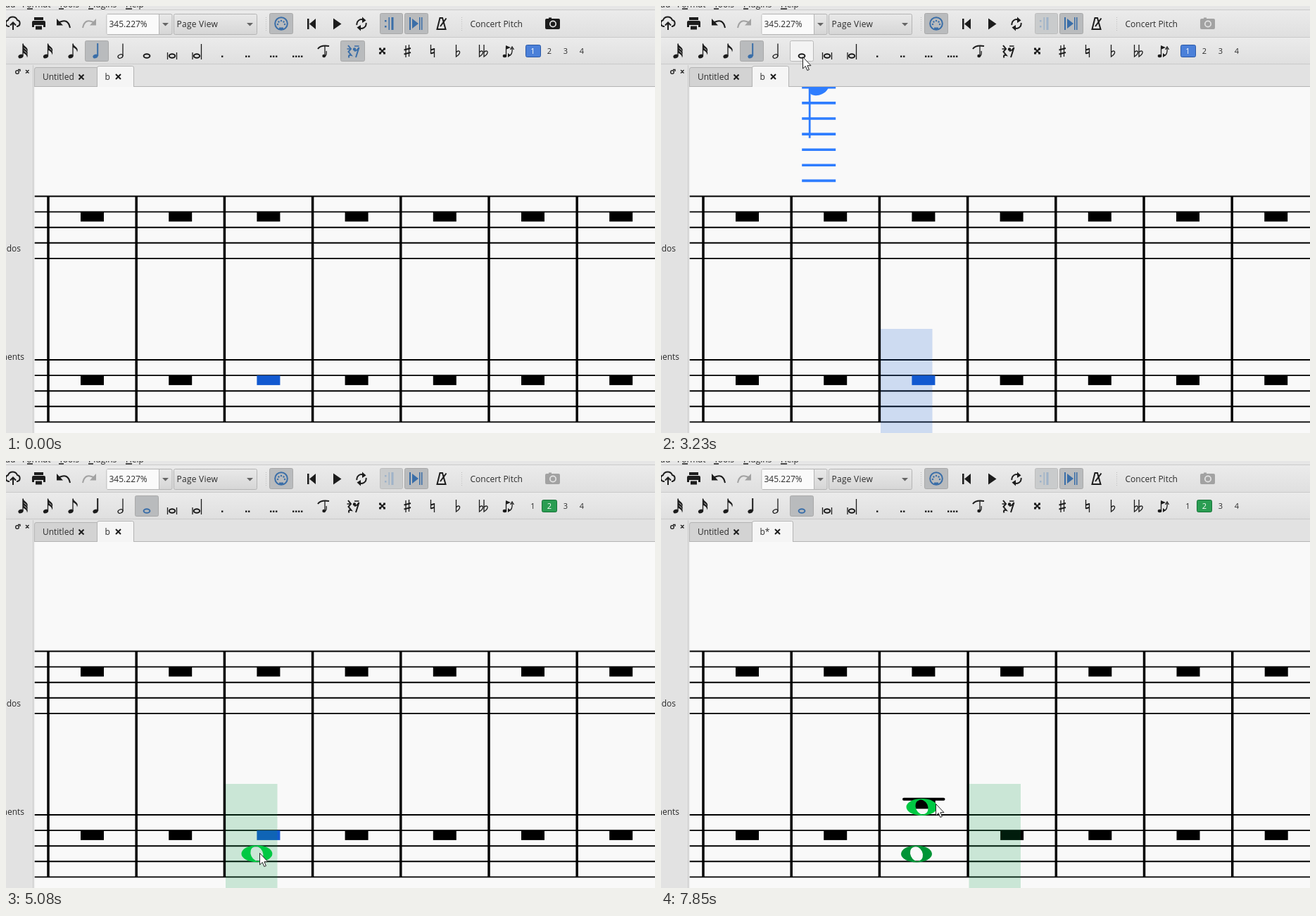
Animation of 922x607 px, one loop 8 s. Source, as an HTML page:

```html
<!DOCTYPE html>
<html lang="en">
<head>
<meta charset="utf-8">
<title>Score editor</title>
<style>
  html, body { margin: 0; width: 100%; height: 100%; overflow: hidden; background: #f9f9f9; }
  svg { display: block; width: 922px; height: 607px; }
  text { font: 12px "Open Sans", "Noto Sans", sans-serif; fill: #2b2b2b; }
  .mid { text-anchor: middle; font-size: 11px; }
  .end { text-anchor: end; }
  .line { fill: none; stroke: #1c1c1c; stroke-width: 2; }
  .thin { fill: none; stroke: #1c1c1c; stroke-width: 1.3; }
  .ink { fill: #1c1c1c; }
  .blue .ink { fill: #3a6ea8; }
  .blue .line, .blue .thin { stroke: #3a6ea8; }
  .pale .ink { fill: #9fb3c8; }
  .pale .line, .pale .thin { stroke: #9fb3c8; }
  .gray .ink { fill: #a2a2a2; }
  .gray .line { stroke: #a2a2a2; }
  .down { fill: #b9bbbd; stroke: #a9a9a9; }
  .pale .down { fill: #c9cbcc; stroke: #bdbdbd; }
  .hover { fill: #f3f3f3; stroke: #b9b9b9; }
  .up { fill: none; stroke: none; }
  .edge { stroke: #b4b4b4; }
</style>
</head>
<body>
<svg viewBox="0 0 922 607">
  <defs>
    <linearGradient id="bar" x2="0" y2="1"><stop stop-color="#ebebeb"/><stop offset="1" stop-color="#dfdfdf"/></linearGradient>
    <linearGradient id="btn" x2="0" y2="1"><stop stop-color="#e9e9e9"/><stop offset="1" stop-color="#d6d6d6"/></linearGradient>
    <clipPath id="page"><rect x="40.5" y="115" width="882" height="492"/></clipPath>
  </defs>

  <rect width="922" height="607" fill="#f9f9f9"/>
  <g clip-path="url(#page)">
    <g id="staff"></g>
    <rect id="select" y="459" width="73.5" height="148" opacity=".19"/>
    <path id="placed" fill="#009436" fill-rule="evenodd"/>
    <g id="preview">
      <path id="ledgers" fill="none" stroke-width="3.6"/>
      <path id="stem" fill="none" stroke-width="2.8"/>
      <path id="head" fill-rule="evenodd"/>
    </g>
  </g>

  <!-- side panel and tabs -->
  <path d="M0 83H922V115H40.5V607H0Z" fill="#e2e2e2"/>
  <path d="M38.5 84V607" stroke="#cbcbcb"/>
  <text class="end" x="21" y="349">ndos</text>
  <text class="end" x="26" y="503">ments</text>
  <circle class="thin" cx="16" cy="94" r="2.3"/><path class="thin" d="M17 90.500H20V93M28 91L32.500 95.500M32.500 91L28 95.500"/>
  <path class="edge" d="M40.500 114.500V90Q40.500 87.500 43 87.500H129.500V114.500" fill="#d3d3d3"/>
  <path class="edge" d="M40 114.500H922"/>
  <path class="edge" id="tab" fill="#f5f5f5"/>
  <text x="52" y="105">Untitled</text>
  <path class="line" d="M103.500 97.500L110.500 104.500M110.500 97.500L103.500 104.500"/>
  <text id="name" x="140.500" y="104.500"></text>
  <path class="line" id="close" d="M-3.500 -3.500L3.500 3.500M3.500 -3.500L-3.500 3.500"/>

  <!-- menu and toolbars -->
  <rect width="922" height="6" fill="#e6e6e6"/>
  <rect y="6" width="922" height="39" fill="url(#bar)"/>
  <rect y="45" width="922" height="38" fill="url(#bar)"/>
  <path d="M0 5.500H922M0 44.500H922M0 82.500H922" stroke="#cacaca"/>
  <text x="-9" y="2">Add</text><text x="23" y="2">Format</text><text x="75" y="2">Tools</text>
  <text x="117" y="2">Plugins</text><text x="170" y="2">Help</text>
  <path class="thin" stroke-width="1" d="M30 4H38M75 4H82M117 4H124M170 4H179"/>

  <path class="line" d="M5 29H4A4.600 4.600 0 0 1 3 20A7 7 0 0 1 16 20A4.600 4.600 0 0 1 16 29H15M10 34V24M6 27.500L10 23.500L14 27.500"/>
  <path class="ink" d="M40 16H53V20H40ZM39 21H54Q56 21 56 23V30H53V27H40V30H37V23Q37 21 39 21ZM42 28.500H51V33.500H42Z"/>
  <g id="undo"><path class="line" d="M76 23Q88 17 91 31"/><path class="ink" d="M72 18V27.500H81Z"/></g>
  <g class="gray" transform="translate(200) scale(-1 1)"><path class="line" d="M76 23Q88 17 91 31"/><path class="ink" d="M72 18V27.500H81Z"/></g>

  <rect class="edge" x="143" y="11.500" width="93" height="29" rx="2" fill="url(#btn)"/>
  <rect x="143.500" y="12" width="73.500" height="28" fill="#fafafa"/>
  <path class="edge" d="M217.500 12V40"/>
  <rect class="edge" x="238.500" y="11.500" width="118" height="29" rx="2" fill="url(#btn)"/>
  <path d="M222 24H231L226.500 28.500ZM342 24H351L346.500 28.500Z" fill="#666"/>
  <text x="146.500" y="30">345.227%</text>
  <text x="242.500" y="30" letter-spacing=".25">Page View</text>

  <path d="M369.500 16V36M647.500 16V36" stroke="#bdbdbd" stroke-dasharray="1 2"/>
  <g class="blue">
    <rect class="down" x="374.500" y="10.500" width="33" height="29" rx="2"/>
    <circle class="line" cx="391" cy="25" r="8.800" stroke-width="1.800"/>
    <path class="ink" d="M388 30.500H394V33H388Z"/>
    <g class="ink" id="pins"></g>
  </g>
  <path class="ink" d="M428 18H430.500V33H428ZM440 18V33L431 25.500ZM465 17.500L476.500 25.500L465 33.500Z"/>
  <path class="line" d="M498.500 27A6.500 6.500 0 0 1 508 20M511.500 24A6.500 6.500 0 0 1 502 31"/>
  <path class="ink" d="M506 15.500L511.500 20.500L506 24ZM504 27L498.500 30.500L504 35.500Z"/>
  <g id="repeat">
    <rect class="down" x="531.500" y="10.500" width="32" height="29" rx="2"/>
    <path class="ink" d="M538 20H540.500V22.500H538ZM538 28H540.500V30.500H538ZM543.500 16H545V34H543.500ZM547.500 16H550.500V34H547.500Z"/>
  </g>
  <g class="blue">
    <rect class="down" x="566.500" y="10.500" width="33" height="29" rx="2"/>
    <path class="ink" d="M573 16H575V34H573ZM577 18L586 25L577 32ZM587 16H588.500V34H587ZM590 16H591.500V34H590Z"/>
  </g>
  <path class="line" stroke-width="1.800" d="M616.500 17H620L624.500 33H612.500ZM617 29L625.500 17.500"/>
  <text x="659.500" y="30">Concert Pitch</text>
  <g id="camera">
    <path class="ink" d="M768 18H771V16.500H775V18H785Q787 18 787 20V31Q787 33 785 33H768Q766 33 766 31V20Q766 18 768 18Z"/>
    <circle cx="777" cy="25.500" r="5" fill="#e4e4e4"/><circle class="ink" cx="777" cy="25.500" r="3.300"/>
  </g>

  <g id="notes"></g>
  <g id="rests">
    <rect x="475.500" y="49.500" width="34" height="29" rx="2"/>
    <path class="line" d="M486 56L490 61L486.500 65L490.500 70Q485.500 69 487.500 73.500M495 63.500Q498 64.500 501.500 59L497 73"/>
    <circle class="ink" cx="495" cy="61.500" r="2.200"/>
    <path class="thin" d="M484.500 61H489M495 57H501.500"/>
  </g>
  <path class="line" d="M443 61Q447 55 459 57"/><path class="thin" d="M453 57V72Q456 69 455 64"/><circle class="ink" cx="451.500" cy="71" r="2.200"/>
  <path class="line" d="M531 60.500L538 67.500M538 60.500L531 67.500"/>
  <path class="ink" d="M530 59.500h3v3h-3zM536 59.500h3v3h-3zM530 65.500h3v3h-3zM536 65.500h3v3h-3z"/>
  <path class="thin" d="M568 56V73M572.500 55V72M603.500 55V68M608.500 60V73"/>
  <path class="line" d="M565.500 62.500L575 60M565.500 68.500L575 66M603.500 62.500L608.500 61M603.500 67.500L608.500 66"/>
  <g id="flats"></g>
  <path class="thin" d="M710.500 71V58M714.500 71Q720 69 719 60M716.500 62L719 58L721.500 62"/>
  <ellipse class="ink" cx="708.500" cy="71" rx="2.800" ry="2.200"/><path class="ink" d="M710 56L717 59L710 62ZM713 67V73L717 70Z"/>
  <rect id="voice" y="55.500" width="21" height="17" rx="2"/>
  <g id="digits"></g>

  <path id="cursor" d="M0 0V16.500L3.800 13L6.300 19L8.900 18L6.400 12.200H11.500Z" fill="#fff" stroke="#222" stroke-linejoin="round"/>
</svg>
<script>
const LOOP = 8000, PITCH = 125.2, GAP = 22.1;
const $ = id => document.getElementById(id);
const set = (id, attrs) => { for (const k in attrs) $(id).setAttribute(k, attrs[k]); };
const show = (id, on) => set(id, { visibility: on ? 'visible' : 'hidden' });
const barX = i => 60 + PITCH * i;
const range = (n, f) => Array.from({ length: n }, (_, i) => f(i)).join('');

// Toolbar glyphs
const blob = (x, y = 71.5) =>
  `<ellipse class="ink" cx="${x}" cy="${y}" rx="3.7" ry="2.8" transform="rotate(-22 ${x} ${y})"/>`;
const ring = (x, rx, ry) => `<ellipse class="line" cx="${x}" cy="71" rx="${rx}" ry="${ry}"/>`;
const flagged = (x, n) => blob(x) + `<path class="thin" d="M${x + 3} 71V53.5"/>` +
  range(n, i => `<path class="ink" d="M${x + 3} ${53 + i * 4}q1 3 4.500 5.500q3.500 3 1.500 7q0 -4.500 -6 -7z"/>`);
const button = (id, x, glyph) =>
  `<g id="${id}"><rect x="${x}" y="49.500" width="33" height="29" rx="2"/>${glyph}</g>`;
const dots = (x, n) =>
  range(n, i => `<rect class="ink" x="${x - n * 2 + i * 4 + 1}" y="70.500" width="2.400" height="2.400"/>`);

$('notes').innerHTML = flagged(21, 3) + flagged(56.5, 2) + flagged(92, 1) +
  button('quarter', 112.5, blob(127) + '<path class="line" stroke-width="1.600" d="M130.200 71V53"/>') +
  '<ellipse class="thin" cx="162.500" cy="71.500" rx="3.600" ry="2.500" transform="rotate(-25 162.500 71.500)"/><path class="thin" d="M166 71V53.500"/>' +
  button('whole', 183.5, ring(200, 4.4, 2.8)) +
  ring(236, 4.2, 2.7) + '<path class="thin" d="M229.500 66V76M242.500 66V76"/>' +
  ring(271, 4.2, 2.7) + '<path class="thin" d="M265 66V76M277.500 54V76"/>' +
  dots(307, 1) + dots(343, 2) + dots(380, 3) + dots(414, 4);
$('flats').innerHTML = [639.5, 672.5, 679].map(x =>
  `<path class="thin" stroke-width="1.600" d="M${x} 55V72Q${x + 6} 68 ${x + 5} 65Q${x + 3} 62.500 ${x} 66"/>`).join('');
$('digits').innerHTML = [748.5, 772, 795, 818].map((x, i) =>
  `<text class="mid" x="${x}" y="68">${i + 1}</text>`).join('');
$('pins').innerHTML = range(5, i => {
  const a = Math.PI * (1 + i / 4);
  return `<circle cx="${391 + 5 * Math.cos(a)}" cy="${26 + 5 * Math.sin(a)}" r="1.200"/>`;
});

// Score
const rest = (x, y, id = '') => `<rect id="${id}" x="${x}" y="${y}" width="33" height="13.700"/>`;
const column = i => {
  const x = barX(i);
  return `<path d="M${x} 270V592" stroke="#000" stroke-width="3.500"/>` +
    rest(x + 46, 292.7) + rest(x + 46, 525.2, i === 2 ? 'chosen' : '');
};
$('staff').innerHTML =
  range(10, i => {
    const y = (i < 5 ? 270.5 : 392.5) + GAP * i;
    return `<path d="M40 ${y}H922" stroke="#000" stroke-width="1.900"/>`;
  }) +
  range(3, column) + `<g id="later">${range(4, i => column(i + 3))}</g>` +
  '<path id="restLine" d="M345 480.700H401.500" stroke="#000" stroke-width="4" stroke-linecap="round"/>';

const WHOLE = 'M-22 0A22 12 0 1 1 22 0A22 12 0 1 1 -22 0ZM-4.400 -9.500A8 10.500 -25 1 1 4.400 9.500A8 10.500 -25 1 1 -4.400 -9.500Z';
const QUARTER = 'M-13.600 6.340A15 10.500 -25 1 1 13.600 -6.340A15 10.500 -25 1 1 -13.600 6.340Z';
set('placed', { d: WHOLE, transform: 'translate(363 558.500)' });

// Pointer moves: start, end, steps, control x y, end x y
const MOVES = [
  [140, 750, 9, 500, 560, 374, 529],
  [910, 1140, 4, 346, 508, 381, 526],
  [2390, 3160, 11, 420, 250, 202, 72],
  [3230, 3230, 1, 201, 72, 201, 72],
  [3390, 3390, 1, 200, 72, 200, 72],
  [3540, 4310, 11, 860, 210, 765, 75],
  [4390, 4690, 5, 767, 68, 768, 64],
  [4860, 5080, 4, 600, 350, 360, 557],
  [5150, 5610, 7, 354, 619, 348, 557],
  [5690, 5690, 1, 347, 557, 347, 557],
  [6080, 6080, 1, 349, 556, 349, 556],
  [6540, 6540, 1, 378, 539, 378, 539],
  [6610, 6610, 1, 399, 522, 399, 522],
  [6780, 7010, 4, 413, 508, 414, 491],
  [7240, 7550, 5, 403, 490, 391, 488],
  [7700, 7850, 3, 390, 487, 390, 487]
];

function pointer(t) {
  let x = 710, y = 588;
  for (const [from, to, n, cx, cy, ex, ey] of MOVES) {
    if (t < from) break;
    const k = n > 1 ? Math.min(n - 1, Math.floor((t - from) / (to - from) * (n - 1) + 0.001)) : 0;
    const p = (k + 1) / n, u = (1 - Math.cos(Math.PI * p)) / 2, v = 1 - u;
    x = v * v * x + 2 * u * v * cx + u * u * ex;
    y = v * v * y + 2 * u * v * cy + u * u * ey;
  }
  return [x, y];
}

function drawPreview(t, px, py, color, added) {
  const outside = py < 115;
  const on = t >= 2220 && !(t >= 4620 && outside) && !(t >= 6000 && t < 6080);
  show('preview', on);
  if (!on) return;
  const whole = t >= 3540 && !(outside && t < 3900);
  const col = outside ? (t < 3900 ? 1 : 6) : Math.floor((px - 16) / PITCH);
  const x = added ? 370.5 : barX(col) + (whole ? 46 : 39);
  const top = py < 431 ? 270.5 : 503;
  const row = outside ? -14 : Math.max(-14, Math.round((py - top) / (GAP / 2)));
  const y = top + row * GAP / 2;
  let d = '';
  const ledger = r => { d += `M${x - 24} ${top + r * GAP / 2}h48`; };
  for (let r = -2; r >= row; r -= 2) ledger(r);
  for (let r = 10; r <= row; r += 2) ledger(r);
  set('ledgers', { d, stroke: color });
  set('stem', { d: whole ? '' : `M${x - 13} ${y}v72`, stroke: color });
  set('head', { d: whole ? WHOLE : QUARTER, transform: `translate(${x} ${y})`, fill: color });
}

function render(t) {
  const [px, py] = pointer(t);
  const input = t >= 1840, whole = t >= 3310, second = t >= 4620, added = t >= 6000;
  const toggle = (id, state) => {
    set(id, { class: state === 'down' ? 'blue' : '' });
    $(id).firstElementChild.setAttribute('class', state);
  };
  toggle('quarter', whole ? 'up' : 'down');
  const over = px > 183 && px < 217 && py < 79;
  toggle('whole', whole ? 'down' : over ? 'hover' : 'up');
  toggle('rests', input ? 'up' : 'down');
  set('repeat', { class: input ? 'pale' : 'blue' });
  set('camera', { class: input ? 'gray' : '' });
  set('voice', second ? { x: 761.5, fill: '#2a9d52', stroke: '#177238' }
                      : { x: 738.5, fill: '#4b80d9', stroke: '#2a58a5' });
  [...$('digits').children].forEach((el, i) => {
    el.style.fill = i === (second ? 1 : 0) ? '#fff' : '';
  });

  const right = added ? 187.5 : 181.5;
  set('tab', { d: `M129.500 115V88Q129.500 85.500 132 85.500H${right - 2}Q${right} 85.500 ${right} 88V115` });
  set('close', { transform: `translate(${added ? 165.5 : 159.5} 100.500)` });
  $('name').textContent = added ? 'b*' : 'b';

  show('select', input);
  set('select', { x: added ? 437.5 : 312, fill: second ? '#009640' : '#1259d0' });
  set('chosen', { x: added ? 356.8 : 356.4, y: added ? 480.7 : 525.2, fill: added ? '#000' : '#1259d0' });
  set('later', { transform: `translate(${added ? 0.5 : 0})` });
  show('restLine', added);
  show('placed', added);
  drawPreview(t, px, py, second ? '#00c943' : '#2e7dff', added);

  show('cursor', t >= 140);
  set('cursor', { transform: `translate(${Math.round(px) + 0.5} ${Math.round(py) + 0.5})` });
}

const start = performance.now();
function tick() {
  render((performance.now() - start) % LOOP);
  requestAnimationFrame(tick);
}
tick();
</script>
</body>
</html>
```
